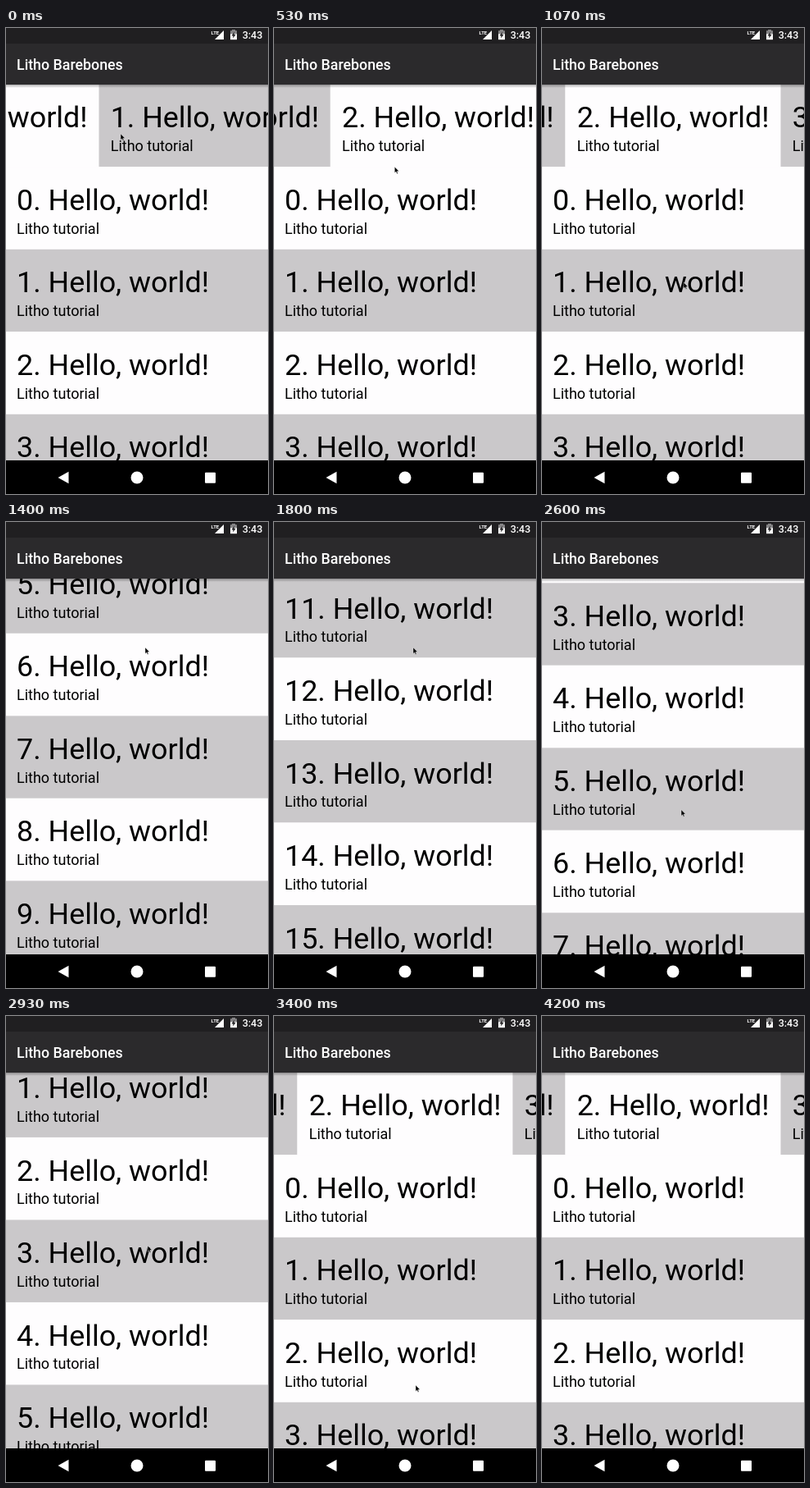
Recreate the animation shown at these times as an HTML page with a canvas. Size 320 by 568 pixels, loop 4.27 s.

```html
<!DOCTYPE html>
<html lang="en">
<head>
<meta charset="utf-8">
<title>Litho Barebones</title>
<style>
html, body { margin: 0; width: 100%; height: 100%; overflow: hidden; background: #000; }
canvas { display: block; width: 320px; height: 568px; }
</style>
</head>
<body>
<canvas id="stage"></canvas>
<script>
const W = 320, H = 568, LOOP = 4270, STEP = 1000 / 15, STEPS = 64;
const BAR_BOTTOM = 69, NAV_TOP = 527;
const ROW = 100.5, CARD = 263, LIST_TOP = 169.3;
const WHITE = '#fefdfe', GRAY = '#cac8ca';

const canvas = document.getElementById('stage');
const dpr = window.devicePixelRatio || 1;
canvas.width = W * dpr;
canvas.height = H * dpr;
const ctx = canvas.getContext('2d');

// Pointer tip: time, x, y
const pointerPath = [
  [0, 140, 129], [400, 140, 129], [1000, 173, 310], [1090, 173, 310],
  [1200, 170, 153], [1952, 170, 153], [2080, 169, 376], [2500, 169, 376],
  [2880, 173, 280], [2970, 173, 280], [3150, 173, 450]
];
const POINTER_HIDE = 3600;

const fling = (distance, ms) => distance * (1 - Math.exp(-ms / 565));

function listScroll(t) {
  if (t < 1090) return 0;
  if (t < 1200) return 156.5 * ((t - 1090) / 110) ** 2;
  if (t < 1952) return 156.5 + fling(1610, Math.min(t, 1800) - 1200);
  if (t < 2080) return 1209.7 - 223 * (t - 1952) / 128;
  const coast = 986.7 - fling(981, Math.min(t, 2970) - 2080);
  if (t < 2970) return coast;
  return coast * (1 - Math.min(1, (t - 2970) / 200)) ** 1.5;
}

function carouselScroll(t) {
  const left = 1 - Math.min(1, t / 900);
  return 497.5 - 348 * left ** 2.4;
}

function pointerAt(t) {
  const i = pointerPath.findIndex(p => p[0] > t);
  if (i < 0) return pointerPath[pointerPath.length - 1].slice(1);
  const [t0, x0, y0] = pointerPath[i - 1], [t1, x1, y1] = pointerPath[i];
  const u = (t - t0) / (t1 - t0);
  return [x0 + (x1 - x0) * u, y0 + (y1 - y0) * u];
}

function rect(color, x, y, w, h) {
  ctx.fillStyle = color;
  ctx.fillRect(x, y, w, h);
}

function polygon(color, points) {
  ctx.fillStyle = color;
  ctx.beginPath();
  points.forEach(([x, y]) => ctx.lineTo(x, y));
  ctx.closePath();
  ctx.fill();
}

function label(text, x, y, size, color, weight = 400) {
  ctx.font = `${weight} ${size}px Roboto, sans-serif`;
  ctx.fillStyle = color;
  ctx.fillText(text, x, y);
}

function item(n, x, y, width, textX) {
  rect(n % 2 ? GRAY : WHITE, x, y, width, ROW);
  label(`${n}. Hello, world!`, textX, y + 52.6, 35.9, '#000');
  label('Litho tutorial', textX, y + 81.4, 18, '#000');
}

function drawList(t) {
  const scroll = listScroll(t);
  ctx.save();
  ctx.beginPath();
  ctx.rect(0, BAR_BOTTOM, W, NAV_TOP - BAR_BOTTOM);
  ctx.clip();
  rect(WHITE, 0, BAR_BOTTOM, W, NAV_TOP - BAR_BOTTOM);

  const carouselY = LIST_TOP - ROW - scroll;
  if (carouselY + ROW > BAR_BOTTOM) {
    const offset = carouselScroll(t);
    for (let n = 0; n < 5; n++) {
      const x = n * CARD - offset;
      if (x < W && x + CARD > 0) item(n, x, carouselY, CARD, x + 14.2);
    }
  }
  const first = Math.max(0, Math.floor((scroll - ROW) / ROW));
  for (let n = first; n < first + 7; n++) {
    item(n, 0, LIST_TOP + n * ROW - scroll, W, 13);
  }

  const shadow = ctx.createLinearGradient(0, BAR_BOTTOM, 0, BAR_BOTTOM + 4);
  shadow.addColorStop(0, 'rgba(0,0,0,.3)');
  shadow.addColorStop(1, 'rgba(0,0,0,0)');
  rect(shadow, 0, BAR_BOTTOM, W, 4);
  ctx.restore();
}

function drawPointer(t) {
  if (t >= POINTER_HIDE) return;
  const [x, y] = pointerAt(t);
  const shape = [[0, 0], [0, 7.4], [1.7, 5.9], [2.9, 8.5], [4, 8], [2.9, 5.5], [5.2, 5.3]]
    .map(([dx, dy]) => [x + dx, y + dy]);
  polygon('#000', shape);
  ctx.strokeStyle = 'rgba(255,255,255,.6)';
  ctx.lineWidth = 0.6;
  ctx.stroke();
}

function drawBars() {
  rect('#201f21', 0, 0, W, 19);
  rect('#2b2a2c', 0, 19, W, BAR_BOTTOM - 19);
  label('Litho Barebones', 13, 51, 17.8, '#fff', 500);

  polygon('#fff', [[266, 3], [266, 14], [255, 14]]);
  label('LTE', 250.5, 7.5, 6, '#fff', 700);
  rect('#858486', 276, 2, 4, 2);
  rect('#858486', 274, 3.2, 8, 4);
  rect('#fff', 274, 7.2, 8, 7);
  polygon('#201f21', [[278.8, 4.8], [275.5, 9.5], [277.5, 9.5], [277.2, 12.6], [280.5, 7.9], [278.5, 7.9]]);
  label('3:43', 288.7, 13, 12.5, '#fff', 500);

  rect('#000', 0, NAV_TOP, W, H - NAV_TOP);
  polygon('#fff', [[63.5, 548], [76.5, 540.8], [76.5, 555.2]]);
  ctx.beginPath();
  ctx.arc(160, 548, 7.5, 0, Math.PI * 2);
  ctx.fill();
  ctx.beginPath();
  ctx.roundRect(243, 541.7, 13, 13, 1);
  ctx.fill();
}

function render() {
  const now = performance.now() % LOOP;
  // Frames begin on rounded times, slightly ahead of the exact step.
  const t = Math.min(STEPS - 1, Math.floor((now + 8) / STEP)) * STEP;
  ctx.setTransform(dpr, 0, 0, dpr, 0, 0);
  drawList(t);
  drawBars();
  drawPointer(t);
  requestAnimationFrame(render);
}
render();
</script>
</body>
</html>
```
